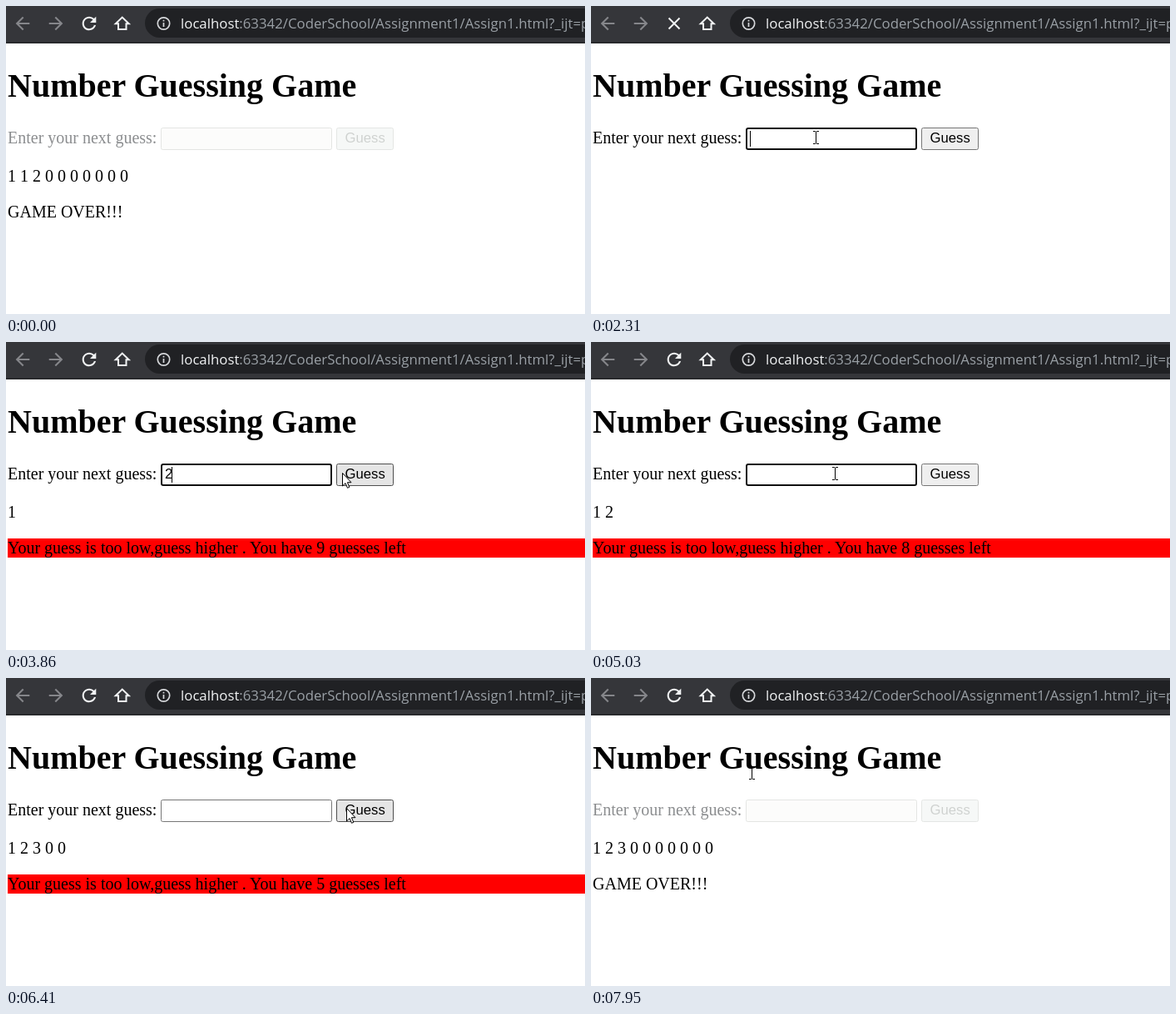
Animation of 696x370 px, one loop 8 s. Source, as an HTML page:

```html
<!DOCTYPE html>
<html lang="en">
<head>
<meta charset="utf-8">
<title>Number Guessing Game</title>
<style>
  html, body { margin: 0; width: 100%; height: 100%; overflow: hidden; background: #fff; }
  svg { display: block; width: 696px; height: 370px; }
  .serif { font: 20px "Liberation Serif", "Times New Roman", serif; }
  .title { font-size: 40px; font-weight: bold; }
  .sans { font: 16.67px "Liberation Sans", Arial, sans-serif; }
  .url { font: 16.8px "Open Sans", "Noto Sans", sans-serif; fill: #9aa0a6; }
</style>
</head>
<body>
<svg viewBox="0 0 696 370">
  <rect width="696" height="370" fill="#fff"/>
  <!-- browser bar -->
  <rect width="696" height="45" fill="#35363a"/>
  <rect y="43" width="696" height="2" fill="#28292c"/>
  <rect x="167" y="3" width="600" height="35" rx="17.5" fill="#202124"/>
  <g fill="#85868a">
    <path id="back" transform="translate(7.5 8.5) scale(1.04)" d="M20 11H7.83l5.59-5.59L12 4l-8 8 8 8 1.41-1.41L7.83 13H20z"/>
    <use href="#back" transform="matrix(-1 0 0 1 80 0)"/>
  </g>
  <path id="reload" fill="#f1f3f4" transform="translate(87.5 8.5) scale(1.04)" d="M17.65 6.35C16.2 4.9 14.21 4 12 4c-4.42 0-7.99 3.58-7.99 8s3.57 8 7.99 8c3.73 0 6.84-2.55 7.73-6h-2.08c-.82 2.33-3.04 4-5.65 4-3.31 0-6-2.69-6-6s2.69-6 6-6c1.66 0 3.14.69 4.22 1.78L13 11h7V4z"/>
  <g stroke="#f1f3f4" stroke-width="2" fill="none">
    <path id="stop" d="M93.5 14.5l13 13m0-13l-13 13"/>
    <path d="M131.8 21.2H135V28H144.5V21.2H147.7L139.75 13.6Z"/>
  </g>
  <g stroke="#d5d7da" stroke-width="1.7" fill="none">
    <circle cx="189.5" cy="21" r="7.2"/>
    <path d="M189.5 20v5M189.5 16.8v1.8"/>
  </g>
  <text class="url" x="210" y="27"><tspan fill="#f1f3f4">localhost</tspan>:63342/CoderSchool/Assignment1/Assign1.html?_ijt=p</text>

  <!-- page -->
  <text class="serif title" x="2" y="109">Number Guessing Game</text>
  <text class="serif" id="label" x="2" y="165">Enter your next guess:</text>
  <rect id="field" rx="2"/>
  <text class="sans" id="value" x="190.9" y="164"></text>
  <rect id="caret" y="150" width="1" height="19"/>
  <rect id="button" x="397.5" y="146.5" width="68" height="26" rx="2"/>
  <text class="sans" id="caption" x="407.6" y="164">Guess</text>
  <text class="serif" id="list" x="2" y="211"></text>
  <rect id="band" x="2" y="236" width="694" height="23" fill="#f00"/>
  <text class="serif" id="message" x="2" y="254"></text>

  <path id="arrow" d="M-.5.5V16L3 12.6 5.5 18.3 7.8 17.3 5.4 11.7H10Z" fill="#fff" stroke="#000"/>
  <path id="beam" d="M-3.5-7.5h3M.5-7.5h3M-3.5 7.5h3M.5 7.5h3M0-7V7" fill="none" stroke="#000"/>
</svg>
<script>
const LOOP = 8000, STEP = 78, BLINK = 530;
const RELOAD = 1920, CLEARED = 2000, LOADED = 2770;
const TRIES = 10;

// Pointer stops: arrival time, travel time, x, y
const stops = [
  [150, 0, 464, 288], [530, 300, 257, 163], [780, 0, 238, 148], [1080, 150, 257, 165],
  [1610, 450, 107, 43], [1920, 200, 100, 22], [2310, 230, 270, 158], [2930, 460, 427, 156],
  [3620, 310, 267, 164], [3860, 90, 405, 157], [4482, 160, 293, 158],
  [5260, 80, 307, 158], [5802, 230, 410, 156], [7950, 160, 193, 114]
];

// Typed guesses, then quick clicks on an empty field
const rounds = [
  { focus: 2310, type: 2640, send: 3160 },
  { focus: 3620, type: 3770, send: 4170 },
  { focus: 4500, type: 5490, send: 5802 }
];
const FIRST_CLICK = 6190, CLICK_GAP = 190;
const sendTime = i => i < rounds.length ? rounds[i].send : FIRST_CLICK + (i - rounds.length) * CLICK_GAP;
const guesses = Array.from({ length: TRIES }, (_, i) => i < rounds.length ? i + 1 : 0);

const el = {};
document.querySelectorAll("[id]").forEach(node => el[node.id] = node);
const set = (node, attrs) => {
  for (const key in attrs) node.setAttribute(key, attrs[key]);
};
const show = (node, on) => set(node, { visibility: on ? "visible" : "hidden" });
const inside = (p, x, y, w, h) => p.x >= x && p.x < x + w && p.y >= y && p.y < y + h;

function pointerAt(t) {
  let p = null;
  for (const [end, travel, x, y] of stops) {
    const elapsed = t - end + travel;
    if (elapsed < 0) break;
    if (t >= end) { p = { x, y }; continue; }
    const k = (Math.floor(elapsed / STEP) + 1) / (Math.round(travel / STEP) + 1);
    return { x: Math.round(p.x + (x - p.x) * k), y: Math.round(p.y + (y - p.y) * k) };
  }
  return p;
}

function drawPage(t, p) {
  const fresh = t >= CLEARED;
  const count = guesses.filter((_, i) => t >= sendTime(i)).length;
  const over = !fresh || count === TRIES;

  el.list.textContent = fresh ? guesses.slice(0, count).join(" ") : "1 1 2 0 0 0 0 0 0 0";
  el.message.textContent = over ? "GAME OVER!!!"
    : count ? `Your guess is too low,guess higher . You have ${TRIES - count} guesses left` : "";
  show(el.band, !over && count > 0);
  set(el.label, { fill: over ? "#8b8d8f" : "#000" });

  const round = rounds[count];
  const focus = round && t >= round.focus;
  const typed = round && t >= round.type;
  const line = focus ? 2 : 1;
  set(el.field, {
    x: 186 + line / 2, y: 146 + line / 2, width: 206 - line, height: 27 - line,
    "stroke-width": line,
    stroke: over ? "#e4e5e3" : focus ? "#101010" : "#767676",
    fill: over ? "#fcfcfb" : "#fff"
  });
  el.value.textContent = typed ? guesses[count] : "";
  const blinkStart = typed ? round.type : focus ? round.focus : 0;
  show(el.caret, focus && Math.floor((t - blinkStart) / BLINK) % 2 === 0);
  set(el.caret, { x: typed ? 199 : 191 });

  const hover = p && inside(p, 397, 146, 69, 27);
  const [fill, stroke] = over ? ["#f6f8f7", "#e4e6e4"]
    : hover ? ["#e5e5e5", "#4f4f4f"] : ["#efefef", "#767676"];
  set(el.button, { fill, stroke });
  set(el.caption, { fill: over ? "#cfd2d0" : "#000" });
  return over;
}

function render(t) {
  const p = pointerAt(t);
  const over = drawPage(t, p);
  const loading = t >= RELOAD && t < LOADED;
  show(el.reload, !loading);
  show(el.stop, loading);

  const onText = p && (inside(p, 2, 73, 420, 46) || (!over && inside(p, 186, 146, 206, 27)));
  show(el.arrow, p && !onText);
  show(el.beam, onText);
  if (p) {
    set(el.arrow, { transform: `translate(${p.x} ${p.y})` });
    set(el.beam, { transform: `translate(${p.x + 0.5} ${p.y})` });
  }
}

const start = performance.now();
function tick() {
  render((performance.now() - start) % LOOP);
  requestAnimationFrame(tick);
}
tick();
</script>
</body>
</html>
```
